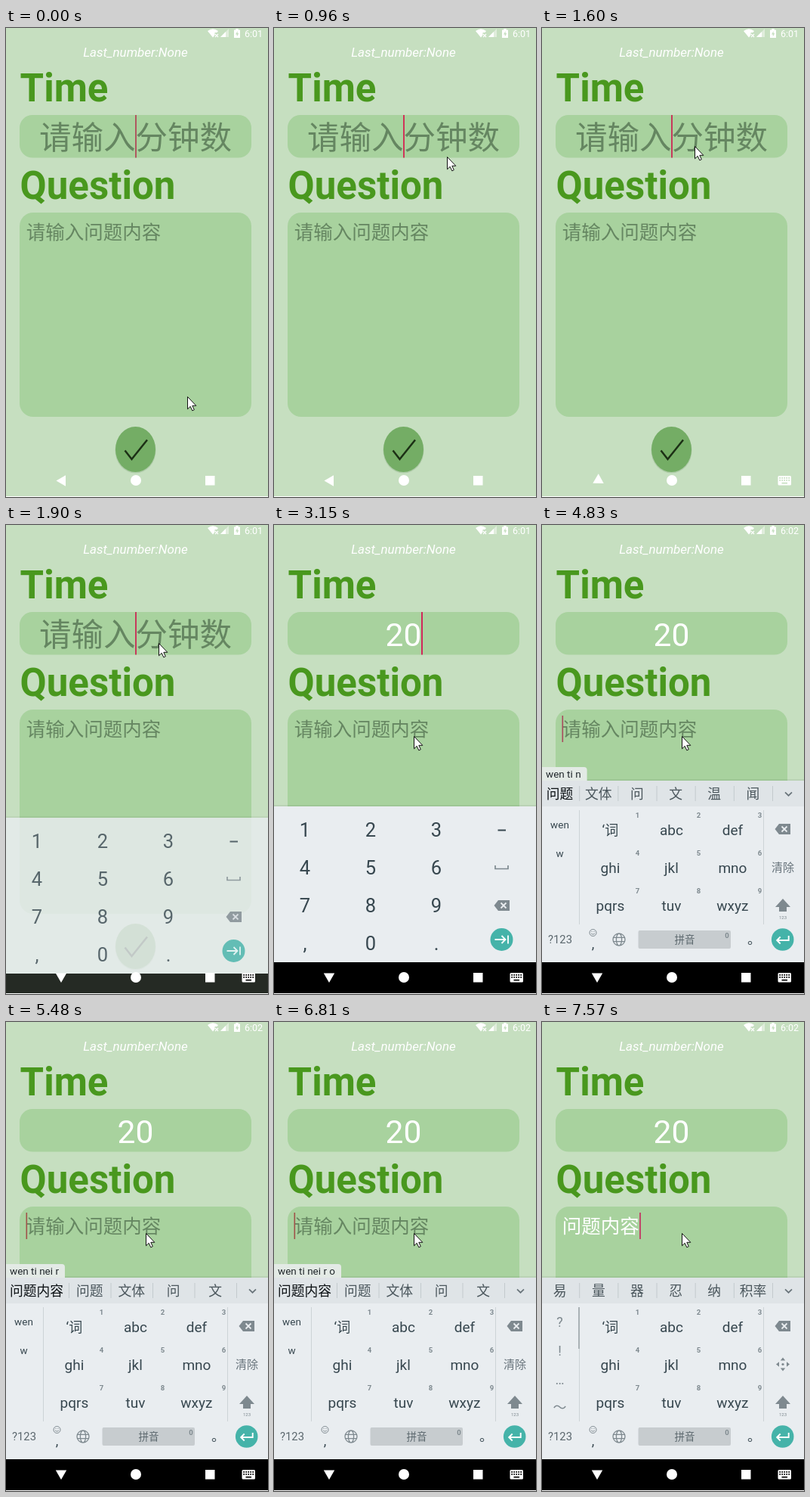
Animation of 347 by 620 pixels, one loop 8 s. Source, as an HTML page with a canvas:

```html
<!DOCTYPE html>
<html lang="zh-CN">
<head>
<meta charset="utf-8">
<title>Timer form</title>
<style>
html, body { margin: 0; height: 100%; overflow: hidden; background: #fff; }
canvas { display: block; width: 100vw; height: 100vh; }
</style>
</head>
<body>
<canvas></canvas>
<script>
const W = 347, H = 620, LOOP = 8000;
const canvas = document.querySelector('canvas');
const g = canvas.getContext('2d');
const dpr = window.devicePixelRatio || 1;
canvas.width = W * dpr;
canvas.height = H * dpr;

const BG = '#c6dfc0', FIELD = '#a8d29e', TITLE = '#49981e', HINT = '#658661';
const KEYS = '#e9edf0', BAR = '#dfe4e7', INK = '#37474f', GREY = '#7e898f', TEAL = '#45b3a9';

// Mouse: time, x, y
const MOUSE = [
  [360, 240, 487], [580, 246, 410], [735, 245, 290], [884, 237, 192], [960, 229, 170],
  [1188, 202, 156], [2600, 202, 156], [2800, 197, 215], [2990, 185, 279]
];

// Caret: from, to, x, top, height, colour
const CARET = [
  [0, 70, 171, 115, 56.5, '#af5860'],
  [570, 1070, 171, 115, 56.5, '#cf355a'],
  [1360, 2060, 171, 115, 56.5, '#c63a5c'],
  [2060, 2670, 195, 115, 56.5, '#d0285a'],
  [3150, 3450, 195, 115, 56.5, '#d0285a'],
  [3450, 4000, 26.5, 252, 35, '#c0476a'],
  [4450, 4900, 26.5, 252, 35, '#a84a5c'],
  [5480, 6030, 26.5, 252, 35, '#a0524a'],
  [6580, 7020, 26.5, 252, 35, '#a0524a'],
  [7510, LOOP, 129, 252, 35, '#c0476a']
];

// Typing: from, composed letters, candidates, side column
const PUNCT = ['?', '!', '…', '～'];
const TWO = '问题 文体 问 文 温 闻', FOUR = '问题内容 问题 文体 问 文';
const SIDE = ['wen', 'w'];
const TYPING = [
  [3680, '', '', PUNCT],
  [4000, 'w', '我 无 为 位 问 文', ['w', 'x', 'y', 'z']],
  [4150, 'we', '为 问 文 位 微 未', ['we', 'w']],
  [4220, 'wen', '问 文 温 闻 稳 吻', ['wen', 'we']],
  [4370, 'wen t', TWO, SIDE],
  [4530, 'wen ti', TWO, SIDE],
  [4830, 'wen ti n', TWO, SIDE],
  [4900, 'wen ti ne', TWO, SIDE],
  [5070, 'wen ti nei', TWO, SIDE],
  [5240, 'wen ti nei r', FOUR, SIDE],
  [6810, 'wen ti nei r o', FOUR, SIDE],
  [6870, 'wen ti nei ron', FOUR, SIDE],
  [7020, 'wen ti nei rong', FOUR, SIDE],
  [7510, '', '易 量 器 忍 纳 积率', PUNCT]
];

const clamp = v => Math.max(0, Math.min(1, v));

function text(s, x, y, size, color, align = 'center', style = '') {
  g.font = `${style} ${size}px Roboto, "Noto Sans CJK SC", "Noto Sans CJK", sans-serif`;
  g.textAlign = align;
  g.fillStyle = color;
  g.fillText(s, x, y);
}

function rect(x, y, w, h, color, r = 0) {
  g.beginPath();
  g.roundRect(x, y, w, h, r);
  g.fillStyle = color;
  g.fill();
}

function oval(x, y, rx, color, ry = rx) {
  g.beginPath();
  g.ellipse(x, y, rx, ry, 0, 0, 7);
  g.fillStyle = color;
  g.fill();
}

function path(d, x, y, fill, stroke, width = 1, angle = 0) {
  const p = new Path2D(d);
  g.save();
  g.translate(x, y);
  g.rotate(angle);
  if (fill) { g.fillStyle = fill; g.fill(p); }
  if (stroke) { g.strokeStyle = stroke; g.lineWidth = width; g.stroke(p); }
  g.restore();
}

function statusBar(t) {
  path('M0 3.5Q7-2 14 3.5L7 12Z', 267, 0.5, '#fff');
  rect(276.5, 6, 6, 7, BG);
  path('M0 0L4 4M4 0L0 4', 277, 8, null, '#fff', 1.2);
  path('M0 11L11 0V11Z', 284, 1, 'rgba(255,255,255,.45)');
  path('M0 11L7 4V11Z', 284, 1, '#fff');
  path('M0 1.5H2.3V0H5.7V1.5H8V12H0Z', 302, 1, '#fff');
  path('M4.6 3L2 7.4H3.8V10.4L6.2 6H4.6Z', 302, 1, BG);
  text(t < 4370 ? '6:01' : '6:02', 328, 11.5, 12.5, '#fff');
}

function form(t) {
  text('Last_number:None', 171.5, 38, 17, '#fff', 'center', 'italic');
  text('Time', 18.6, 97, 51, TITLE, 'left', 'bold');
  text('Question', 18.6, 226, 51, TITLE, 'left', 'bold');
  rect(18, 115, 307, 56.5, FIELD, 17);
  rect(18, 244, 307, 270, FIELD, 18);
  if (t < 2060) text('请输入分钟数', 171.5, 160, 42.5, HINT);
  else text('20', 171.5, 160, 42.5, '#fff');
  if (t < 7510) text('请输入问题内容', 26.7, 279, 25.5, HINT, 'left');
  else text('问题内容', 26.7, 279, 25.5, '#fff', 'left');
  for (const [from, to, x, y, h, color] of CARET)
    if (t >= from && t < to) rect(x, y, x < 100 ? 1.6 : 2, h, color);
  oval(171.5, 558.5, 27, 'rgba(60,110,50,.18)', 30);
  oval(171.5, 557, 26.5, '#74ad65', 30);
  path('M0 0L9 11.5L29.5-14', 157.5, 558.5, null, '#1c3015', 2.5);
}

function navBar(t) {
  path('M-6.5 0L6-7.2V7.2Z', 73, 598.5, '#fff', null, 1, -Math.PI / 2 * clamp((t - 1530) / 220));
  oval(172, 598, 7, '#fff');
  rect(264, 592, 12.5, 12.5, '#fff');
  if (t < 1600) return;
  rect(312.5, 592, 17.5, 12.5, '#fff', 1.5);
  const dot = t < 1900 ? BG : '#000';
  for (let i = 0; i < 10; i++)
    rect(314.3 + i % 5 * 3, 594 + Math.floor(i / 5) * 3, 1.7, 1.7, dot);
  rect(317.5, 600.8, 7.5, 1.7, dot);
}

function backspace(x, y) {
  path('M-10.5 0L-5-7H10V7H-5Z', x, y, GREY);
  path('M-1.5-3.5L5.5 3.5M5.5-3.5L-1.5 3.5', x, y, null, KEYS, 1.8);
}

function panel(top) {
  rect(0, top - 2, W, 2, 'rgba(0,0,0,.06)');
  rect(0, top, W, 578 - top, KEYS);
  rect(0, 578, W, 60, '#000');
}

function keypad() {
  panel(372);
  [...'123456789,0.'].forEach((c, i) =>
    text(c, 41 + i % 3 * 87, 412 + Math.floor(i / 3) * 50, 25.5, INK));
  rect(296.5, 402.5, 10.5, 2, INK);
  path('M-8.5-3V1.5H8.5V-3', 301.5, 453, null, GREY, 1.7);
  backspace(302, 503);
  oval(301.5, 548, 15, TEAL);
  path('M-9 0H5M0-5L5 0L0 5M8.5-5.5V5.5', 301.5, 548, null, '#fff', 1.8);
}

function candidates(letters, words) {
  rect(0, 338, W, 34, BAR);
  if (letters) {
    g.font = '13.5px Roboto, sans-serif';
    rect(0, 320, g.measureText(letters).width + 13, 18, '#e3eae5', [0, 4, 0, 0]);
    text(letters, 5, 334, 13.5, '#22292d', 'left');
  }
  const list = words ? words.split(' ') : [];
  const first = list.length === 5 ? 85 : 51.2;
  let x = 0;
  list.forEach((word, i) => {
    const w = i ? (307 - first) / (list.length - 1) : first;
    text(word, x + w / 2 - 2, 362, 17.8, letters && !i ? '#0c1114' : '#4a565c');
    x += w;
    rect(x - 2, 345, 1, 20, '#c3cacd');
  });
  path('M-4.5-2.2L0 2.2L4.5-2.2', 326.5, 355.5, null, '#6a757b', 1.7);
}

function pinyin([, letters, words, side]) {
  panel(338);
  candidates(letters, words);
  rect(49, 377, 1, 151, '#cdd3d6');
  rect(293, 377, 1, 151, '#cdd3d6');
  const symbols = side === PUNCT;
  if (symbols) rect(48, 377, 2, 55, '#a9b1b5');
  side.forEach((s, i) =>
    text(s, 23.5, (symbols ? 403 : 401) + i * 37.8, symbols ? 18 : 13.5, symbols ? GREY : INK));

  ['‘词', 'abc', 'def', 'ghi', 'jkl', 'mno', 'pqrs', 'tuv', 'wxyz'].forEach((s, i) => {
    const x = 90 + i % 3 * 81, y = 410 + Math.floor(i / 3) * 50;
    text(s, x + 0.4, y, i ? 19 : 18, INK);
    text(i + 1, x + 36.5, y - 23, 9.5, GREY, 'center', 'bold');
  });

  backspace(319, 402);
  if (letters) text('清除', 319, 458, 15, '#66727a');
  else {
    for (let i = 0; i < 4; i++)
      path('M0-9L3.2-5H-3.2Z', 319, 452.5, GREY, null, 1, i * Math.PI / 2);
    oval(319, 452.5, 1.6, GREY);
  }
  path('M0-9L10 2H5V8H-5V2H-10Z', 319, 503, GREY);
  text('123', 319, 521, 6, GREY);

  text('?123', 24, 553, 14.8, '#5b676d');
  path('M4.5 0A4.5 4.5 0 1 1-4.5 0A4.5 4.5 0 1 1 4.5 0M-2.3 1Q0 3.6 2.3 1M-2-1.5H-1M1-1.5H2',
    67.5, 539, null, GREY, 1);
  text(',', 67.5, 560, 18, INK);
  path('M8 0A8 8 0 1 1-8 0A8 8 0 1 1 8 0M3.6 0A3.6 8 0 1 1-3.6 0A3.6 8 0 1 1 3.6 0M-7.5-2.7H7.5M-7.5 2.7H7.5',
    102, 548, null, GREY, 1.3);
  rect(127.5, 536, 122.5, 24, '#c7cccf', 2);
  text('拼音', 189, 553, 13.5, '#5b676d');
  text('0', 245, 546, 9.5, GREY, 'center', 'bold');
  text('。', 272, 554, 18, INK, 'left');
  oval(318.7, 548, 14.8, TEAL);
  path('M8-5V1H-7M-3-3.5L-7.5 1L-3 5.5', 318.7, 548, null, '#fff', 1.9);
}

function mouse(t) {
  // The pointer is sampled in 76 ms ticks
  const s = t - (t - 428) % 76;
  let [, x, y] = MOUSE[0];
  for (let i = 1; i < MOUSE.length; i++) {
    const [t0, x0, y0] = MOUSE[i - 1], [t1, x1, y1] = MOUSE[i];
    if (s < t0) break;
    const k = clamp((s - t0) / (t1 - t0));
    x = x0 + (x1 - x0) * k;
    y = y0 + (y1 - y0) * k;
  }
  path('M0 0V16.3L3.7 12.8L6.3 18.4L8.8 17.2L6.3 11.8H11.3Z',
    Math.round(x) + 0.5, Math.round(y) + 0.5, '#fff', '#111', 1);
}

function draw(now) {
  const t = now % LOOP;
  g.setTransform(dpr, 0, 0, dpr, 0, 0);
  rect(0, 0, W, H, BG);
  statusBar(t);
  form(t);
  if (t >= 3680) pinyin(TYPING.findLast(step => t >= step[0]));
  else if (t >= 1900) {
    const entering = t < 1980;
    g.save();
    g.globalAlpha = entering ? 0.81 : 1;
    g.translate(0, entering ? 15 : 0);
    keypad();
    g.restore();
  }
  navBar(t);
  mouse(t);
  rect(0, 619, W, 1, '#fff');
}

const start = performance.now();
function tick() {
  draw(performance.now() - start);
  requestAnimationFrame(tick);
}
tick();
</script>
</body>
</html>
```
